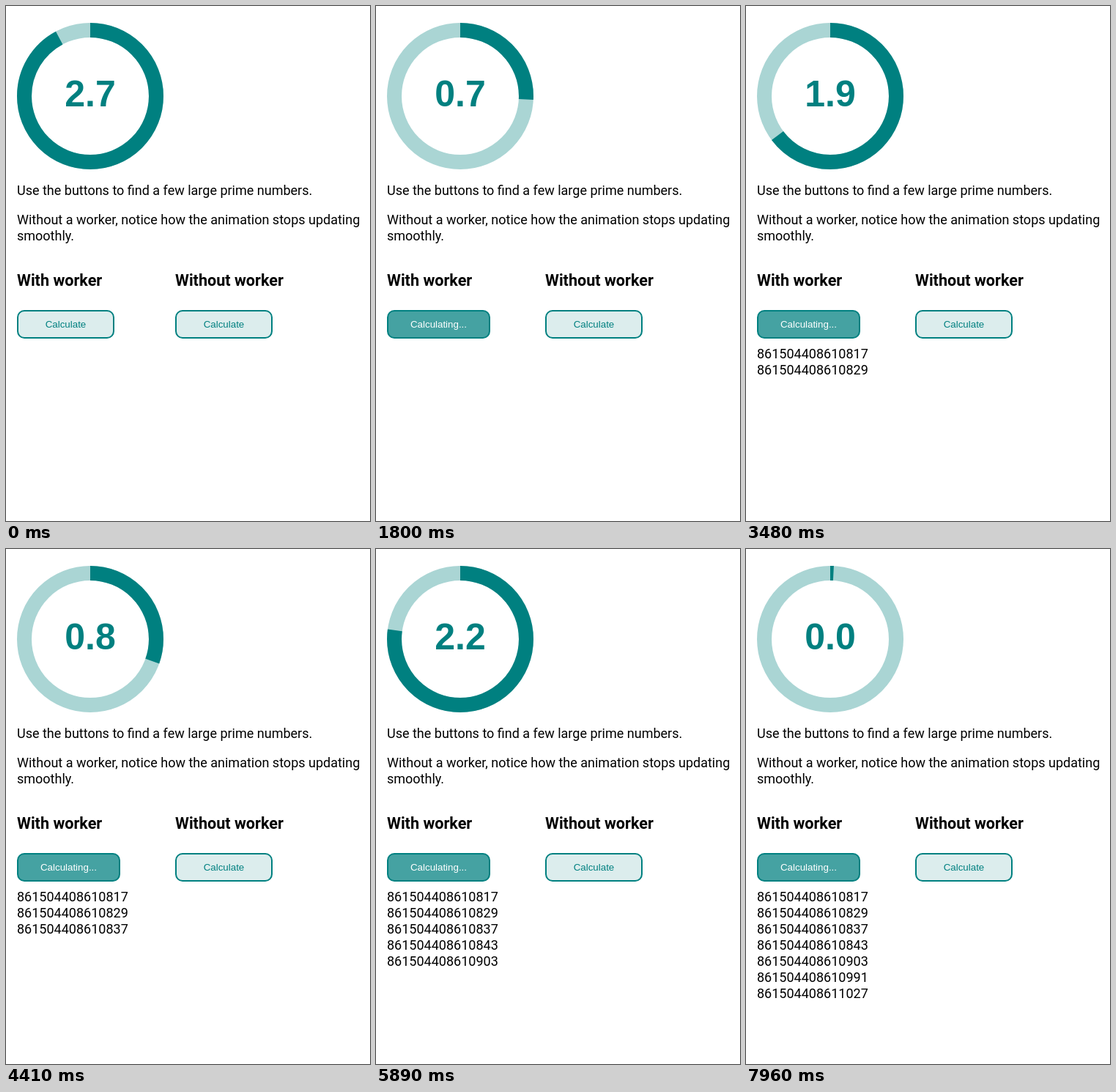
These frames come from a looping animation (497 by 703 pixels, 7990 ms). An HTML page:

```html
<!DOCTYPE html>
<html lang="en">
<head>
<meta charset="utf-8">
<title>Worker demo</title>
<style>
  html, body { margin: 0; width: 100%; height: 100%; overflow: hidden; background: #fff; }
  svg { display: block; font: 18px Roboto, sans-serif; }
  .ring { fill: none; stroke: #aad5d4; stroke-width: 20; }
  #arc { stroke: #008080; }
  #seconds { font: bold 50px "Liberation Sans", Arial, sans-serif; fill: #008080; text-anchor: middle; }
  .heading { font-size: 21.6px; font-weight: 700; }
  .button rect { fill: #dceded; stroke: #008080; stroke-width: 2; }
  .button text { font: 13.333px "Liberation Sans", Arial, sans-serif; fill: #008080; text-anchor: middle; }
  .button.busy rect { fill: #45a2a2; }
  .button.busy text { fill: #fff; }
  #cursor path { fill: #fff; stroke: #0b1620; stroke-width: 1.1; stroke-linejoin: round; }
</style>
</head>
<body>
<svg width="497" height="703" viewBox="0 0 497 703">
  <circle class="ring" cx="115" cy="123" r="90"/>
  <circle class="ring" id="arc" cx="115" cy="123" r="90" pathLength="3" transform="rotate(-90 115 123)"/>
  <text id="seconds" x="115" y="137"></text>

  <text x="15" y="258">Use the buttons to find a few large prime numbers.</text>
  <text x="15" y="298">Without a worker, notice how the animation stops updating</text>
  <text x="15" y="320">smoothly.</text>

  <text class="heading" x="15" y="382">With worker</text>
  <text class="heading" x="231" y="382">Without worker</text>

  <g class="button" id="worker">
    <rect x="16" y="416" width="131" height="37" rx="9"/>
    <text x="81.5" y="439">Calculate</text>
  </g>
  <g class="button">
    <rect x="232" y="416" width="131" height="37" rx="9"/>
    <text x="297.5" y="439">Calculate</text>
  </g>

  <g id="primes"></g>

  <g id="cursor">
    <path id="arrow" d="M.5 .5v16l3.8-3.7 2.6 6 2.4-1-2.6-5.9h5.2z"/>
    <path id="hand" transform="translate(-7 0)" d="M6 15V2.3a1.6 1.6 0 0 1 3.3 0V9c0-2 3-2 3 .2c0-1.6 2.8-1.6 2.8 .6c.2-1.4 2.6-1.4 2.6 .6V16c0 3-2 4-2 7.5H8C8 20.5 5.5 19 3.8 16L1.2 12.8c-.8-1.6 1.2-2.8 2.6-1.4L6 13.6M9.3 9v4M12.3 9.2v4M15.1 9.8v3.4"/>
  </g>
</svg>
<script>
  const $ = id => document.getElementById(id);
  const LOOP = 7990, CLICK = 1480, FIRST_RESULT = 2340;
  const PRIME_BASE = 861504408610000;
  const endings = [817, 829, 837, 843, 903, 991, 1027];

  // Each search has a fixed cost plus a little for every number skipped.
  let due = FIRST_RESULT;
  const results = endings.map((ending, i) => {
    if (i) due += 820 + 2 * (ending - endings[i - 1]);
    const node = document.createElementNS("http://www.w3.org/2000/svg", "text");
    node.setAttribute("x", 15);
    node.setAttribute("y", 481 + 22 * i);
    node.textContent = PRIME_BASE + ending;
    $("primes").append(node);
    return { node, due };
  });

  const show = (node, visible) => node.setAttribute("visibility", visible ? "visible" : "hidden");

  function drawTimer(t) {
    const tick = Math.floor((t + 10) / 30);
    const period = 3.028;
    const raw = 2.766 - 0.0332 * tick;
    const left = Math.min(3, raw - Math.floor(raw / period) * period);
    $("arc").setAttribute("stroke-dasharray", `${left} 9`);
    $("seconds").textContent = (Math.floor(Math.max(0, left - 0.015) * 10) / 10).toFixed(1);
  }

  function drawButton(busy) {
    const [box, label] = $("worker").children;
    $("worker").classList.toggle("busy", busy);
    box.setAttribute("width", busy ? 139 : 131);
    label.setAttribute("x", busy ? 85.5 : 81.5);
    label.textContent = busy ? "Calculating..." : "Calculate";
  }

  function drawCursor(t) {
    const progress = Math.min(1, Math.max(0, (t - 150) / 650));
    const remaining = (1 - progress) ** 2.5;
    const x = 98 + 153 * remaining, y = 449 + 254 * remaining;
    const visible = t >= 150 && t < CLICK, hovering = y < 454;
    $("cursor").setAttribute("transform", `translate(${x} ${y})`);
    show($("arrow"), visible && !hovering);
    show($("hand"), visible && hovering);
  }

  function draw(now) {
    const t = now % LOOP;
    drawTimer(t);
    drawButton(t >= CLICK);
    drawCursor(t);
    results.forEach(({ node, due }) => show(node, t >= due));
  }

  let start;
  function frame(now) {
    start ??= now;
    draw(now - start);
    requestAnimationFrame(frame);
  }
  draw(0);
  requestAnimationFrame(frame);
</script>
</body>
</html>
```
